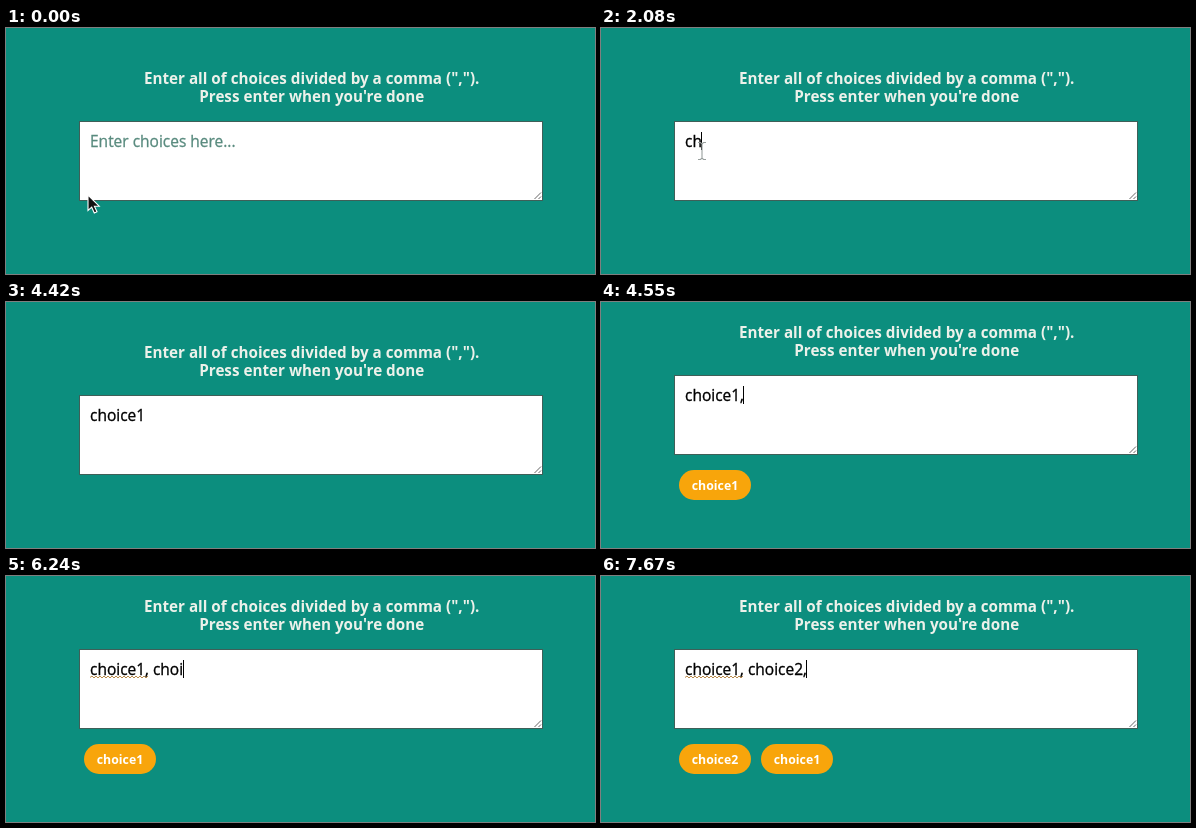
Write an HTML page that moves like this. It is 589 px wide and 246 px high and loops after 8000 ms.

```html
<!DOCTYPE html>
<html lang="en">
<head>
<meta charset="utf-8">
<title>Choice picker</title>
<style>
  html, body { margin: 0; width: 100%; height: 100%; overflow: hidden; background: #0c8e7e; }
  svg { display: block; width: 589px; height: 246px; font-family: "Open Sans", "Noto Sans", sans-serif; }
  .title { font-size: 15.22px; font-weight: 700; fill: #ecf1ea; text-anchor: middle; }
  .input { font-size: 15.5px; white-space: pre; stroke-width: .3px; }
  .tag rect { fill: #f8a50b; }
  .tag text { font-size: 12.3px; font-weight: 700; fill: #fff; text-anchor: middle; }
</style>
</head>
<body>
<svg viewBox="0 0 589 246">
  <rect width="589" height="246" fill="#0c8e7e"/>
  <g id="form">
    <text class="title" x="305.7" y="56">Enter all of choices divided by a comma (",").</text>
    <text class="title" x="305.7" y="74">Press enter when you're done</text>
    <rect id="box" x="73.5" y="93.5" width="463" height="79" fill="#fff"/>
    <path d="M528.5 171L535 164.5M532.5 171L535 168.5" stroke="#666" fill="none"/>
    <text id="hint" class="input" x="84" y="119">Enter choices here...</text>
    <text id="typed" class="input" x="84" y="119" fill="#000" stroke="#000" xml:space="preserve"></text>
    <path id="squiggle" fill="none" stroke="#b98a4a" stroke-width="1"/>
    <rect id="caret" y="104" width="1" height="18" fill="#000"/>
  </g>
  <g id="tag1" class="tag">
    <rect x="78" y="168" width="72" height="30" rx="15"/><text x="114" y="188">choice1</text>
  </g>
  <g id="tag2" class="tag">
    <rect x="78" y="168" width="72" height="30" rx="15"/><text x="114" y="188">choice2</text>
  </g>
  <path id="arrow" d="M0 0V15.5L3.7 12.2L6.3 18L9 16.8L6.4 11.2H11.2Z" fill="#111" stroke="#fff" stroke-width="1.1"/>
  <path id="beam" d="M-4 -8.5H-1.5L0 -7L1.5 -8.5H4M0 -7V7M-4 8.5H-1.5L0 7L1.5 8.5H4" fill="none" stroke="#989f9d" stroke-width="1.1"/>
</svg>
<script>
const LOOP = 8000, BLINK = 600, FOCUS = 780, HIDE_POINTER = 3120;
const FIRST_TAG = 4550, SPELLCHECK = 5070, SECOND_TAG = 7540;
const TEXT = "choice1, choice2,";
const KEYS = [1820, 2080, 2470, 2860, 2990, 3120, 3770, FIRST_TAG, SPELLCHECK,
  5590, 5980, 6110, 6240, 6370, 6500, 7150, SECOND_TAG];
// Pointer stops: time, x, y
const POINTER = [[0, 82, 167], [130, 90, 150], [260, 97, 131], [520, 99, 127], [650, 101, 123]];

const el = id => document.getElementById(id);
const form = el("form"), box = el("box"), hint = el("hint"), typed = el("typed"), caret = el("caret"),
  squiggle = el("squiggle"), arrow = el("arrow"), beam = el("beam"), tag1 = el("tag1"), tag2 = el("tag2");
const show = (node, on) => node.setAttribute("visibility", on ? "visible" : "hidden");
const move = (node, x, y) => node.setAttribute("transform", `translate(${x} ${y})`);

let wave = "M84 121.5";
for (let x = 86; x <= 142; x += 2) wave += `L${x} ${x % 4 ? 120 : 122}`;
squiggle.setAttribute("d", wave);

function render(t) {
  const count = KEYS.filter(k => k <= t).length;
  const text = TEXT.slice(0, count);
  if (typed.textContent !== text) typed.textContent = text;

  const focused = t >= FOCUS;
  const hintColor = focused ? "#5f7a6d" : "#588a7e";
  show(hint, !count);
  hint.setAttribute("fill", hintColor);
  hint.setAttribute("stroke", hintColor);
  box.setAttribute("stroke", focused && !count ? "#83a09a" : "#3f5f58");

  const lastKey = count ? KEYS[count - 1] : FOCUS;
  const width = count ? typed.getComputedTextLength() : 0;
  caret.setAttribute("x", Math.floor(84 + width));
  show(caret, focused && (t - lastKey) % (2 * BLINK) < BLINK);
  show(squiggle, t >= SPELLCHECK);

  move(form, 0, t >= FIRST_TAG ? -20 : 0);
  show(tag1, t >= FIRST_TAG);
  show(tag2, t >= SECOND_TAG);
  move(tag1, t >= SECOND_TAG ? 82 : 0, 0);

  const [start, x, y] = POINTER.filter(p => p[0] <= t).pop();
  move(arrow, x, y);
  move(beam, x, y);
  show(arrow, start === 0);
  show(beam, start > 0 && t < HIDE_POINTER);
}

const begin = performance.now();
function tick() {
  render((performance.now() - begin) % LOOP);
  requestAnimationFrame(tick);
}
tick();
</script>
</body>
</html>
```
